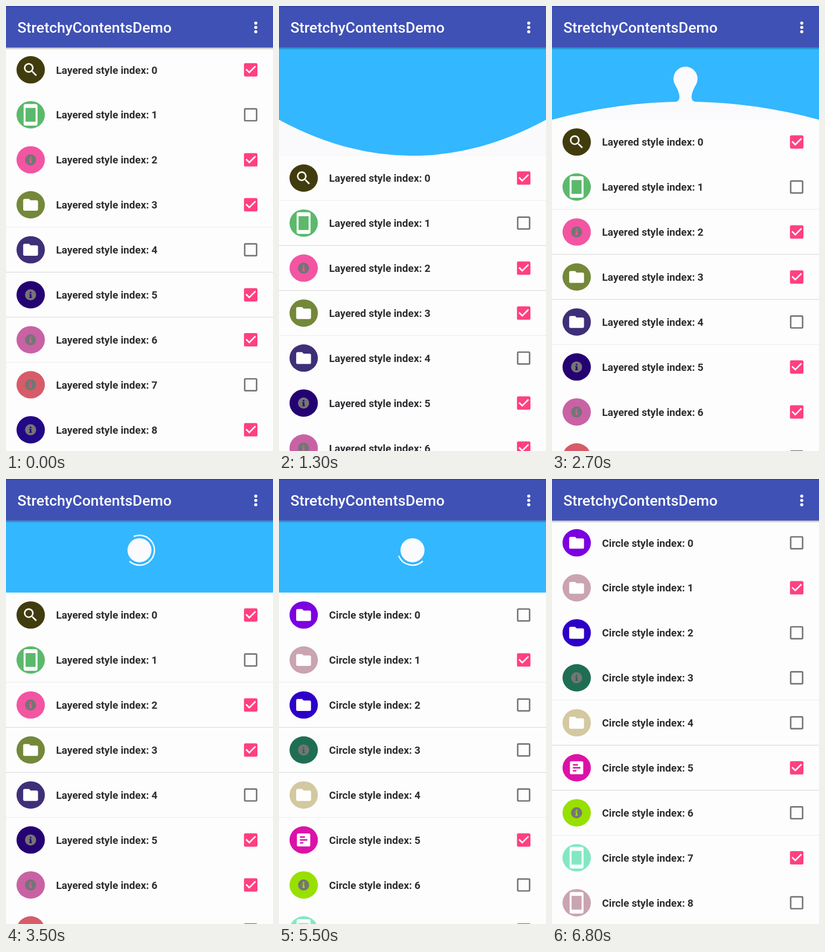
These frames come from a looping animation (480 px wide and 800 px high, 7500 ms). An HTML page:

```html
<!DOCTYPE html>
<html lang="en">
<head>
<meta charset="utf-8">
<title>Pull to refresh</title>
<style>
html, body { margin: 0; width: 100%; height: 100%; overflow: hidden; background: #fafafc; }
svg { display: block; width: 100vw; height: 100vh; }
text { font-family: Roboto, sans-serif; }
</style>
</head>
<body>
<svg id="stage" viewBox="0 0 480 800">
  <defs>
    <linearGradient id="shade" x1="0" y1="0" x2="0" y2="1">
      <stop offset="0" stop-color="#000" stop-opacity=".32"/>
      <stop offset="1" stop-color="#000" stop-opacity="0"/>
    </linearGradient>
  </defs>
  <rect width="480" height="800" fill="#fafafc"/>
  <g transform="translate(0 74.6)">
    <path id="sheet" fill="#33b7ff"/>
    <path id="front" fill="#fbfbfd"/>
    <circle id="ball" cx="240" fill="#fbfbfd"/>
    <path id="ring" fill="none" stroke="#fbfbfd" stroke-width="2.6"/>
    <circle id="halo" cx="240" fill="none" stroke="#fbfbfd" stroke-width="2.6"/>
  </g>
  <g id="list">
    <rect y="74.6" width="480" height="800" fill="#fdfdfd"/>
    <g id="before"></g>
    <g id="after"></g>
  </g>
  <g id="lines"></g>
  <rect y="74" width="480" height="5" fill="url(#shade)"/>
  <rect width="480" height="74.6" fill="#3f51b5"/>
  <rect width="480" height="1.5" fill="#303f9f"/>
  <text x="20.5" y="48" font-size="26.67" font-weight="500" fill="#fff">StretchyContentsDemo</text>
  <g fill="#fff">
    <circle cx="449" cy="30.7" r="2.8"/>
    <circle cx="449" cy="38.5" r="2.8"/>
    <circle cx="449" cy="46.3" r="2.8"/>
  </g>
</svg>
<script>
const LOOP = 7500, STEP = 100; // the picture advances ten times a second
const MID = 240;
const PITCH = 80.889;           // row height
const H = 129.78;               // resting header height
const DELTA = H / 2;            // extra pull beyond the header
const R = H / 6;                // ball radius
const NECK = H - DELTA / 2;     // crest of the upward bow
const REST = NECK - 2 * R - 0.6; // ball centre while refreshing
const RING = R + 5.2;
const SWAP = 5500;              // new data arrives

const $ = id => document.getElementById(id);
const clamp = x => Math.max(0, Math.min(1, x));
const part = (t, from, to) => clamp((t - from) / (to - from));
const decel = x => 1 - (1 - x) * (1 - x);

// Icons are drawn around 0,0
const icons = {
  search: () => `<path transform="scale(1.333) translate(-12 -12)" fill="#fff" d="M15.5 14h-.79l-.28-.27A6.5 6.5 0 1 0 13.7 14.44l.3.28v.78l5 5 1.5-1.5zM9.5 14a4.5 4.5 0 1 1 0-9 4.5 4.5 0 0 1 0 9z"/>`,
  phone: c => `<rect x="-12.5" y="-19.4" width="25" height="38.8" rx="3.6" fill="#fff"/>
    <rect x="-9" y="-12.4" width="18" height="24.8" fill="${c}"/>`,
  folder: () => `<path transform="scale(1.333) translate(-12 -12)" fill="#fff" d="M10 4H4a2 2 0 0 0-2 2v12a2 2 0 0 0 2 2h16a2 2 0 0 0 2-2V8a2 2 0 0 0-2-2h-8z"/>`,
  info: c => `<circle r="10" fill="#757575"/>
    <path fill="${c}" d="M-1.4-5.5h2.8v2.6h-2.8zM-2.5-1.5h3.9v5.4h1.1v1.6h-5v-1.6h1.1V.1h-1.1z"/>`,
  note: c => `<rect x="-12" y="-11.7" width="24" height="23.4" rx="2.6" fill="#fff"/>
    <path fill="${c}" d="M-6.6-6.6H2.4v2.6h-9zM-6.6-1.3H6.8v2.6H-6.6zM-6.6 4H-.4v2.6h-6.2z"/>`
};

const box = on => on
  ? `<rect x="427.8" y="102.7" width="24.2" height="24" rx="2.6" fill="#ff4081"/>
     <path transform="translate(424 98.7) scale(1.333)" fill="#fff" d="M10 17l-5-5 1.41-1.41L10 14.17l7.59-7.59L19 8z"/>`
  : `<rect x="429.1" y="104" width="21.4" height="21.4" rx="1.4" fill="none" stroke="#757575" stroke-width="2.67"/>`;

function rows(word, items) {
  return items.split(' ').map((item, i) => {
    const [color, icon, on] = item.split(',');
    return `<g transform="translate(0 ${i * PITCH})">
      <ellipse cx="44.4" cy="114.7" rx="25.5" ry="24.6" fill="${color}"/>
      <g transform="translate(44.2 114.7)">${icons[icon](color)}</g>
      <text x="90" y="121.6" font-size="18.67" font-weight="700" fill="#2e2d31">${word} style index: ${i}</text>
      ${box(on === '1')}</g>`;
  }).join('');
}

$('before').innerHTML = rows('Layered',
  '#413c0e,search,1 #5bb96c,phone,0 #f355a2,info,1 #74883a,folder,1 #3f2f78,folder,0 ' +
  '#250272,info,1 #c962a5,info,1 #d65c69,info,0 #220886,info,1');
$('after').innerHTML = rows('Circle',
  '#7c00e0,folder,0 #caa4b0,folder,1 #2d00c8,folder,0 #1f6e54,info,0 #d3c8a0,folder,0 ' +
  '#dc12a8,note,1 #98e000,info,0 #82e8c4,phone,1 #caa4b0,phone,0');
$('lines').innerHTML = '<rect width="480" height="1"/>'.repeat(9);

// Finger travel, one value per step from 700 ms on
const pull = [14, 44, 80.56, 115, 146, 174, 1.5 * H];

function listOffset(t) {
  if (t < 700) return 0;
  if (t < 1300) {
    const k = (t - 700) / 100, i = Math.floor(k);
    return pull[i] + (pull[i + 1] - pull[i]) * (k - i);
  }
  if (t < 6510) return H + DELTA * (1 - decel(part(t, 2018, 2218)));
  return H * (0.5 + 0.5 * Math.cos(Math.PI * part(t, 6510, 6790)));
}

const sheet = (base, ctrl) => `M0 0V${base}Q${MID} ${ctrl} 480 ${base}V0Z`;
const hump = (half, base, ctrl) => `M${MID - half} ${base}Q${MID} ${ctrl} ${MID + half} ${base}Z`;

function tail(cy, bottom, f) {
  const y = cy + R * f / 2, x = R * Math.sqrt(1 - f * f / 4);
  const a = R * 0.75 * (1 - f), b = a + R;
  return `M${MID + x} ${y}Q${MID + a} ${bottom} ${MID + b} ${bottom}` +
         `H${MID - b}Q${MID - a} ${bottom} ${MID - x} ${y}Z`;
}

// The two arc ends take turns running at 3 and 10 degrees per tick
function arc(ticks) {
  let start = 90, sweep = 0, grow = true;
  for (let left = ticks; left > 0; left--) {
    const s = Math.min(1, left);
    start += (grow ? 3 : 10) * s;
    sweep += (grow ? 7 : -7) * s;
    if (sweep >= 270) grow = false;
    else if (sweep <= 10) grow = true;
  }
  const at = deg => {
    const r = deg * Math.PI / 180;
    return `${MID + RING * Math.cos(r)} ${REST + RING * Math.sin(r)}`;
  };
  return `M${at(start)}A${RING} ${RING} 0 ${sweep > 180 ? 1 : 0} 1 ${at(start + sweep)}`;
}

function header(t, off) {
  const s = { sheet: '', front: '', ring: '', ball: null, halo: -1 };
  const base = Math.min(off, H);
  let ctrl = base;
  if (t < 2218) {
    const drag = t < 2018 ? off - H : DELTA * (1 - part(t, 2018, 2218));
    ctrl = base + 2 * Math.max(0, drag);
  } else if (t < 2418) {
    const k = part(t, 2218, 2418), y = H - DELTA * k / 2;
    ctrl = H - DELTA * k;
    s.front = hump(2 * R - k * R, y, y - 2 * R * k);
  } else if (t < 2718) {
    const k = part(t, 2418, 2718);
    ctrl = H - DELTA;
    s.ball = NECK + (REST - NECK) * k;
    s.front = tail(s.ball, NECK + 1, k);
  } else if (t < 5510) {
    ctrl = H - DELTA * (1 - part(t, 2718, 2918));
    s.ball = REST;
    if (t > 2812) s.ring = arc((t - 2812) / 16);
  } else if (t < 6510) {
    const k = part(t, 5510, 6510);
    if (k < 0.3) {
      s.ball = REST;
      s.halo = k / 0.3;
    } else if (k < 0.7) {
      const f = (k - 0.3) / 0.4;
      s.ball = REST + (H - REST) * f;
      if (s.ball >= H - 2 * R) s.front = tail(s.ball, H, f);
    } else {
      const f = (k - 0.7) / 0.3;
      s.front = hump(R + 2 * R * f, H, H - R * (1 - f));
    }
  }
  if (off > 0) s.sheet = sheet(base, ctrl);
  return s;
}

function draw(t) {
  const off = listOffset(t), s = header(t, off);
  $('sheet').setAttribute('d', s.sheet);
  $('front').setAttribute('d', s.front);
  $('ring').setAttribute('d', s.ring);
  $('ball').setAttribute('cy', s.ball || 0);
  $('ball').setAttribute('r', s.ball === null ? 0 : R);
  const halo = $('halo');
  halo.style.display = s.halo < 0 ? 'none' : '';
  halo.setAttribute('cy', REST);
  halo.setAttribute('r', RING + 5.2 * Math.max(0, s.halo));
  halo.setAttribute('opacity', clamp(1 - s.halo));

  $('list').setAttribute('transform', `translate(0 ${off})`);
  $('before').style.display = t < SWAP ? '' : 'none';
  $('after').style.display = t < SWAP ? 'none' : '';

  // Hairlines fade with their sub-pixel position
  [...$('lines').children].forEach((line, n) => {
    const u = off - (n + 1) / 9 + 0.611;
    const w = Math.max(0, 1 - 4 * Math.abs(u - Math.round(u)));
    line.setAttribute('y', Math.floor(155.1 + off + n * PITCH));
    line.setAttribute('fill-opacity', 0.2 * w);
  });
}

function tick() {
  const t = performance.now() % LOOP;
  draw(Math.floor(t / STEP) * STEP);
  requestAnimationFrame(tick);
}
tick();
</script>
</body>
</html>
```
